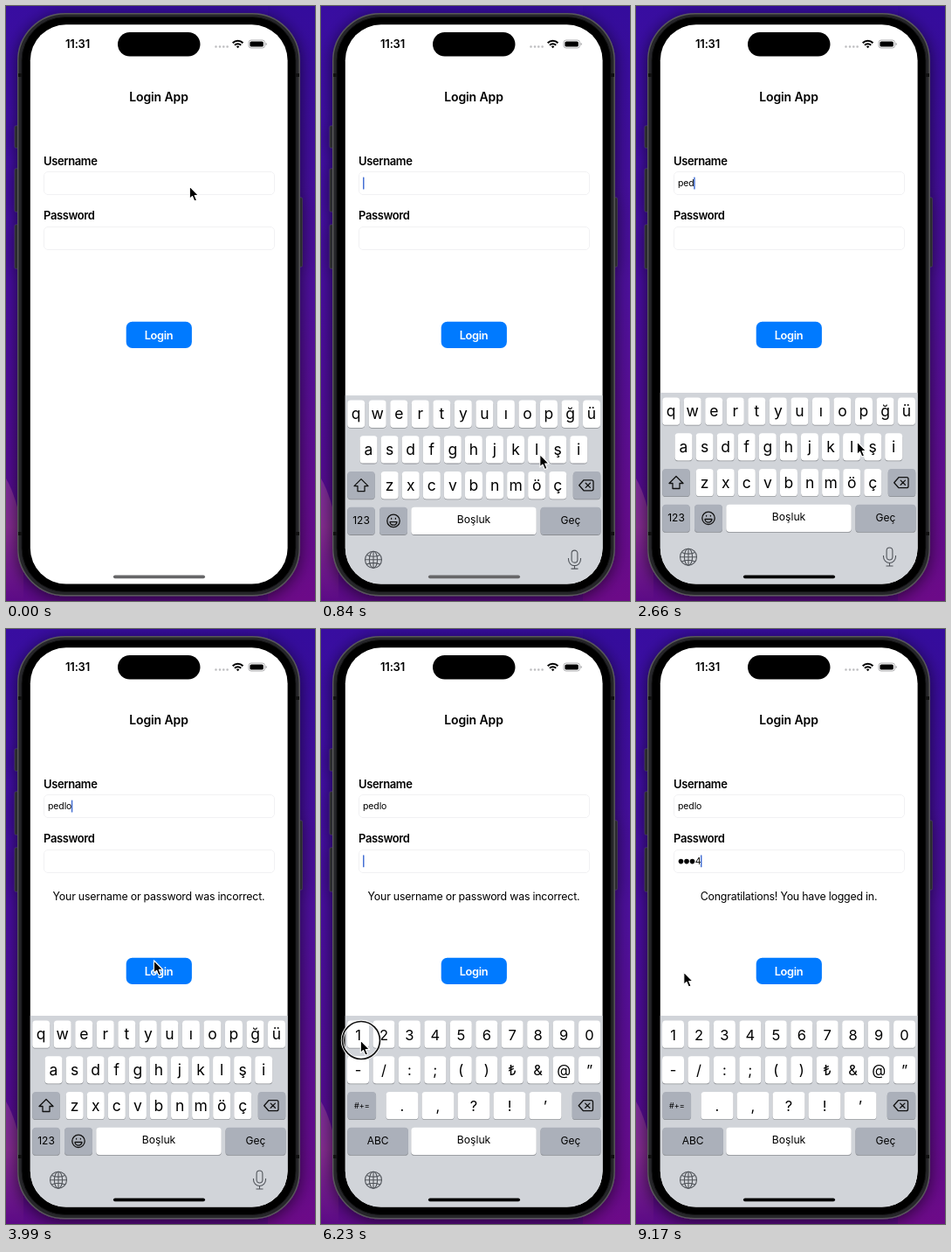
Write an HTML page that moves like this. It is 354 px wide and 680 px high and loops after 9310 ms.

```html
<!DOCTYPE html>
<html lang="en">
<head>
<meta charset="utf-8">
<style>
  html, body { margin: 0; width: 100%; height: 100%; overflow: hidden; background: #3a0d96; }
  svg { display: block; width: 354px; height: 680px; }
  text { font-family: Inter, Roboto, sans-serif; fill: #000; }
  .mid { text-anchor: middle; }
  .label { font-size: 13px; font-weight: 600; letter-spacing: -.38px; }
  .entry { font-size: 10.5px; letter-spacing: -.1px; }
  .note { font-size: 12.4px; letter-spacing: -.22px; }
  .line { fill: none; stroke: #111; stroke-width: 1.3; stroke-linejoin: round; stroke-linecap: round; }
  .thin { fill: none; stroke: #50545a; stroke-width: 1.1; }
</style>
</head>
<body>
<svg viewBox="0 0 354 680">
  <defs>
    <linearGradient id="wall" x2="0" y2="1">
      <stop offset="0" stop-color="#380da0"/><stop offset=".3" stop-color="#430fa6"/>
      <stop offset=".65" stop-color="#4d0d98"/><stop offset="1" stop-color="#5c0a86"/>
    </linearGradient>
    <linearGradient id="glow" x2="0" y2="1">
      <stop offset="0" stop-color="#7a2c98"/><stop offset=".4" stop-color="#842c90"/><stop offset="1" stop-color="#5c0a86"/>
    </linearGradient>
    <linearGradient id="side" x2="0" y2="1">
      <stop offset="0" stop-color="#340c9c"/><stop offset=".5" stop-color="#4e109a"/><stop offset="1" stop-color="#6c0a88"/>
    </linearGradient>
    <clipPath id="screen"><rect x="27.8" y="21.3" width="294.8" height="639.2" rx="41"/></clipPath>
    <filter id="soft" x="-30%" y="-30%" width="160%" height="160%">
      <feDropShadow dx="0" dy="1" stdDeviation="1.6" flood-opacity=".28"/>
    </filter>
    <filter id="shade" x="-15%" y="-8%" width="130%" height="116%">
      <feDropShadow dx="0" dy="3" stdDeviation="9" flood-opacity=".6"/>
    </filter>
  </defs>

  <rect width="354" height="680" fill="url(#wall)"/>
  <rect x="300" width="54" height="680" fill="url(#side)"/>
  <path d="M0 540Q12 560 20 604V680H0Z" fill="url(#glow)"/>

  <g filter="url(#shade)">
    <g fill="#2b2b2e" stroke="#47474a" stroke-width=".6">
      <rect x="10" y="137" width="6" height="25" rx="1.5"/>
      <rect x="10" y="186" width="6" height="49" rx="1.5"/>
      <rect x="10" y="250" width="6" height="50" rx="1.5"/>
      <rect x="333" y="219" width="6.5" height="79" rx="1.5"/>
    </g>
    <rect x="13.7" y="8.7" width="322.5" height="665" rx="54" fill="#272729" stroke="#58585a" stroke-width="1.4"/>
  </g>
  <path d="M14 79h4M14 603h4M331 79h5M331 603h5" stroke="#111" stroke-width="4"/>
  <rect x="18" y="12.5" width="314" height="657" rx="50" stroke="#151516"/>

  <g clip-path="url(#screen)">
    <rect x="27" y="21" width="296" height="640" fill="#fff"/>
    <rect x="128" y="30" width="94.5" height="27.5" rx="13.75"/>
    <text class="mid" x="82" y="48" font-size="13" font-weight="600" letter-spacing="-.2">11:31</text>
    <path d="M240.5 46.5h0m4.5 0h0m4.3 0h0m4.3 0h0" stroke="#bdbdbf" stroke-width="2.6" stroke-linecap="round"/>
    <g fill="none" stroke="#000" stroke-width="2">
      <path d="M259.7 42.3a8.3 8.3 0 0 1 11.8 0M262 44.8a5 5 0 0 1 7.2 0"/>
      <path d="M265.6 48.3l-1.8-2a2.6 2.6 0 0 1 3.6 0z" fill="#000" stroke="none"/>
    </g>
    <rect x="278" y="39" width="18.5" height="9" rx="2.8" fill="none" stroke="#a5a5a7" stroke-width=".9"/>
    <rect x="279.4" y="40.4" width="15.5" height="6.2" rx="1.7"/>
    <path d="M297.6 42v3q1.3-.4 1.3-1.5t-1.3-1.5" fill="#a5a5a7"/>

    <text class="mid" x="175" y="109" font-size="14" font-weight="600" letter-spacing="-.1">Login App</text>
    <text class="label" x="43" y="181.5">Username</text>
    <text class="label" x="43" y="243.5">Password</text>
    <g fill="#fff" stroke="#f1f1f3">
      <rect x="43.5" y="189.5" width="264" height="26" rx="4.5"/>
      <rect x="43.5" y="252.5" width="264" height="26" rx="4.5"/>
    </g>
    <text class="entry" id="user" x="48" y="206.3"></text>
    <g id="dots"></g>
    <text class="entry" id="digit" y="269.3"></text>
    <rect id="caret" width="1.5" height="14" rx=".6" fill="#4570d4"/>
    <text class="note mid" id="note" x="175" y="309.5"></text>
    <g id="button">
      <rect x="137.7" y="360.8" width="75.2" height="30.3" rx="7" fill="#007aff"/>
      <text class="mid" x="175" y="380.6" font-size="12.8" font-weight="600" letter-spacing="-.3" style="fill:#fff">Login</text>
    </g>

    <g id="board">
      <rect x="27" y="442" width="296" height="230" fill="#d1d4d9"/>
      <g id="letters"></g>
      <g id="numbers"></g>
      <g id="wide"></g>
      <g id="narrow"></g>
      <g id="common"></g>
    </g>
    <rect id="home" x="123" y="650.5" width="105" height="3.7" rx="1.85"/>
    <g id="popup">
      <path id="bubble" fill="#fdfdfd" filter="url(#soft)"/>
      <text class="mid" id="big" font-size="27" font-weight="300"></text>
    </g>
  </g>

  <g id="pointer">
    <g id="ring" fill="none">
      <circle r="21.5" stroke="#fff" stroke-width="3.4"/>
      <circle r="21.5" stroke="#111" stroke-width="1.7"/>
    </g>
    <path d="M-.7 0v14.4l3.2-2.9 2.3 5.5 2.7-1.1-2.3-5.4h4.4z" stroke="#fff" stroke-width="1.1" stroke-linejoin="round"/>
  </g>
</svg>

<script>
const $ = id => document.getElementById(id);
const LOOP = 9310, STEP = 70;
const keys = {};

function key(x, y, w, label = '', size = 17.5, drop = 21.5, fill = '#fff') {
  const box = (dy, color) =>
    `<rect x="${x - w / 2}" y="${y + dy}" width="${w}" height="31.3" rx="3.9" fill="${color}"/>`;
  return box(.8, '#8b8e93') + box(0, fill) +
    `<text class="mid" x="${x}" y="${y + drop}" font-size="${size}">${label}</text>`;
}
const grey = (x, y, w, label, size = 12) => key(x, y, w, label, size, size < 10 ? 18.5 : 19, '#abb0ba');

function row(chars, x, pitch, y, w, size, drop) {
  return [...chars].map((ch, i) => {
    const cx = x + i * pitch;
    keys[ch] = { x: cx, y, w };
    return key(cx, y, w, ch, size, drop);
  }).join('');
}

const at = (x, y, body) => `<g transform="translate(${x} ${y})">${body}</g>`;
const erase = '<path class="line" d="M-3-6H6a2 2 0 0 1 2 2V4a2 2 0 0 1-2 2H-3L-8.3 0ZM-.8-2.6 4.4 2.6M4.4-2.6-.8 2.6"/>';

$('letters').innerHTML =
  row('qwertyuıopğü', 40.2, 24.53, 447.5, 20) +
  row('asdfghjklşi', 54.5, 24.07, 488.2, 20) +
  row('zxcvbnmöç', 78.7, 24.07, 529, 20) +
  grey(46, 529, 31.5, '') + grey(304.5, 529, 31.5, '') +
  at(46, 545, '<path class="line" d="M0-7.5 8 .5H4V6.5H-4V.5H-8Z"/>') + at(304, 544.7, erase);

$('numbers').innerHTML =
  row('1234567890', 42.5, 29.45, 447.5, 25, 16.5, 22) +
  row('-/:;()₺&@”', 42.5, 29.45, 488.2, 25, 16.5, 22) +
  row('.,?!’', 93, 41, 529, 37, 16.5, 22) +
  grey(46.8, 529, 32.5, '#+=', 9) + grey(304, 529, 32.5, '') + at(303.5, 544.7, erase);

$('narrow').innerHTML =
  grey(46, 569.7, 31.5, '123') + grey(83, 569.7, 32, '') +
  at(83, 585.3, `<circle class="line" r="7.2"/><path class="line" d="M-4 1.2H4a4 3.6 0 0 1-8 0Z"/>
    <path class="line" d="M-2.4-3v.8M2.4-3v.8"/>`) +
  at(290.5, 629.5, `<rect class="thin" x="-3.4" y="-10.5" width="6.8" height="14" rx="3.4"/>
    <path class="thin" d="M-7-1.5V0a7 7 0 0 0 14 0V-1.5M0 7V10.5M-4 10.5H4"/>`);

$('wide').innerHTML = grey(65.2, 569.7, 69.5, '<tspan id="mode"></tspan>');

$('common').innerHTML =
  key(175, 569.7, 143.5, 'Boşluk', 12.2, 18.5) + grey(286, 569.7, 69, 'Geç') +
  at(60, 629.7, `<circle class="thin" r="9.5"/><ellipse class="thin" rx="4.6" ry="9.5"/>
    <path class="thin" d="M0-9.5V9.5M-9.5 0H9.5M-7.7-5.3Q0-1.8 7.7-5.3M-7.7 5.3Q0 1.8 7.7 5.3"/>`);

// Press times; a key takes effect one step later.
const name = [[1680, 'p'], [1990, 'e'], [2310, 'd'], [2800, 'l'], [3130, 'o']];
const code = [[6200, '1'], [6720, '2'], [7220, '3'], [7700, '4']];
const focus = 320, tryOne = 3760, passFocus = 4540, toNumbers = 5600, tryTwo = 8370;
const strokes = [...name, ...code];
const clicks = [focus, tryOne, passFocus, toNumbers, tryTwo, ...strokes.map(s => s[0])];

// Pointer stops: arrival, departure, x, y
const stops = [
  [0, 70, 211, 206], [290, 430, 196, 204], [800, 1350, 251.5, 512.5], [1650, 1770, 260, 470],
  [1960, 2080, 90, 470], [2280, 2400, 102, 507], [2640, 2680, 254, 498], [2780, 2900, 250, 501],
  [3110, 3230, 237, 470], [3690, 3920, 172, 384], [4470, 4720, 130, 266], [5240, 5270, 92.7, 474.5],
  [5560, 5760, 64, 586], [6150, 6340, 46, 470], [6670, 6860, 73, 470], [7170, 7350, 101, 469],
  [7660, 7980, 124.5, 467], [8320, 8500, 170, 392], [9050, LOOP, 55.5, 392]
];

function pointerAt(t) {
  const i = stops.findLastIndex(s => s[0] <= t);
  const [, leave, x, y] = stops[i], next = stops[i + 1];
  if (t <= leave || !next) return [x, y];
  const p = (t - leave) / (next[0] - leave), e = p * p * (3 - 2 * p);
  return [x + (next[2] - x) * e, y + (next[3] - y) * e];
}

const show = (id, on) => $(id).setAttribute('display', on ? 'inline' : 'none');
const move = (id, x, y) => $(id).setAttribute('transform', `translate(${x} ${y})`);
const typed = (list, t) => list.filter(s => t >= s[0] + 70).map(s => s[1]).join('');

function drawPopup(ch) {
  const { x, y, w } = keys[ch], half = w / 2 + 10;
  const mid = Math.max(29.5 + half, Math.min(320.5 - half, x));
  const l = mid - half, r = mid + half, a = x - w / 2, b = x + w / 2, top = y - 48;
  $('bubble').setAttribute('d', `M${l + 8} ${top}H${r - 8}q8 0 8 8V${y - 16}
    C${r} ${y - 7} ${b} ${y - 7} ${b} ${y + 3}V${y + 27.5}q0 4-4 4H${a + 4}q-4 0-4-4V${y + 3}
    C${a} ${y - 7} ${l} ${y - 7} ${l} ${y - 16}V${top + 8}q0-8 8-8Z`);
  $('big').textContent = ch;
  $('big').setAttribute('x', mid);
  $('big').setAttribute('y', y - 17);
}

function draw(t) {
  const user = typed(name, t), pass = typed(code, t), inPass = t >= passFocus + 70;
  $('user').textContent = user;

  const hidden = Math.max(0, pass.length - 1), digitX = 48 + hidden * 6.6;
  $('dots').innerHTML = [...Array(hidden).keys()]
    .map(i => `<circle cx="${51.5 + i * 6.5}" cy="265.6" r="2.8"/>`).join('');
  $('digit').textContent = pass.slice(-1);
  $('digit').setAttribute('x', digitX);

  show('caret', t >= 420);
  const end = inPass
    ? (pass ? digitX + $('digit').getComputedTextLength() - .5 : 48)
    : 48 + (user ? $('user').getComputedTextLength() - .5 : 0);
  move('caret', end, inPass ? 258.3 : 195.5);

  const failed = t >= tryOne + 70;
  $('note').textContent = t >= tryTwo + 70 ? 'Congratilations! You have logged in.'
    : failed ? 'Your username or password was incorrect.' : '';
  move('button', 0, failed ? 15 : 0);

  const rise = Math.max(0, Math.min(1, (t - 420) / 500));
  move('board', 0, 230 * (1 - rise) ** 2.35);
  const numeric = t >= toNumbers + 70;
  show('letters', !numeric);
  show('numbers', numeric);
  show('narrow', !inPass);
  show('wide', inPass);
  $('mode').textContent = numeric ? 'ABC' : '123';
  $('home').setAttribute('fill', t < 1400 ? '#666668' : '#000');

  const active = strokes.find(s => t >= s[0] + 70 && t < s[0] + 280);
  show('popup', active);
  if (active) drawPopup(active[1]);

  move('pointer', ...pointerAt(t));
  show('ring', clicks.some(c => t >= c && t < c + 140));
}

function frame() {
  draw(Math.floor(performance.now() % LOOP / STEP) * STEP);
  requestAnimationFrame(frame);
}
frame();
</script>
</body>
</html>
```
